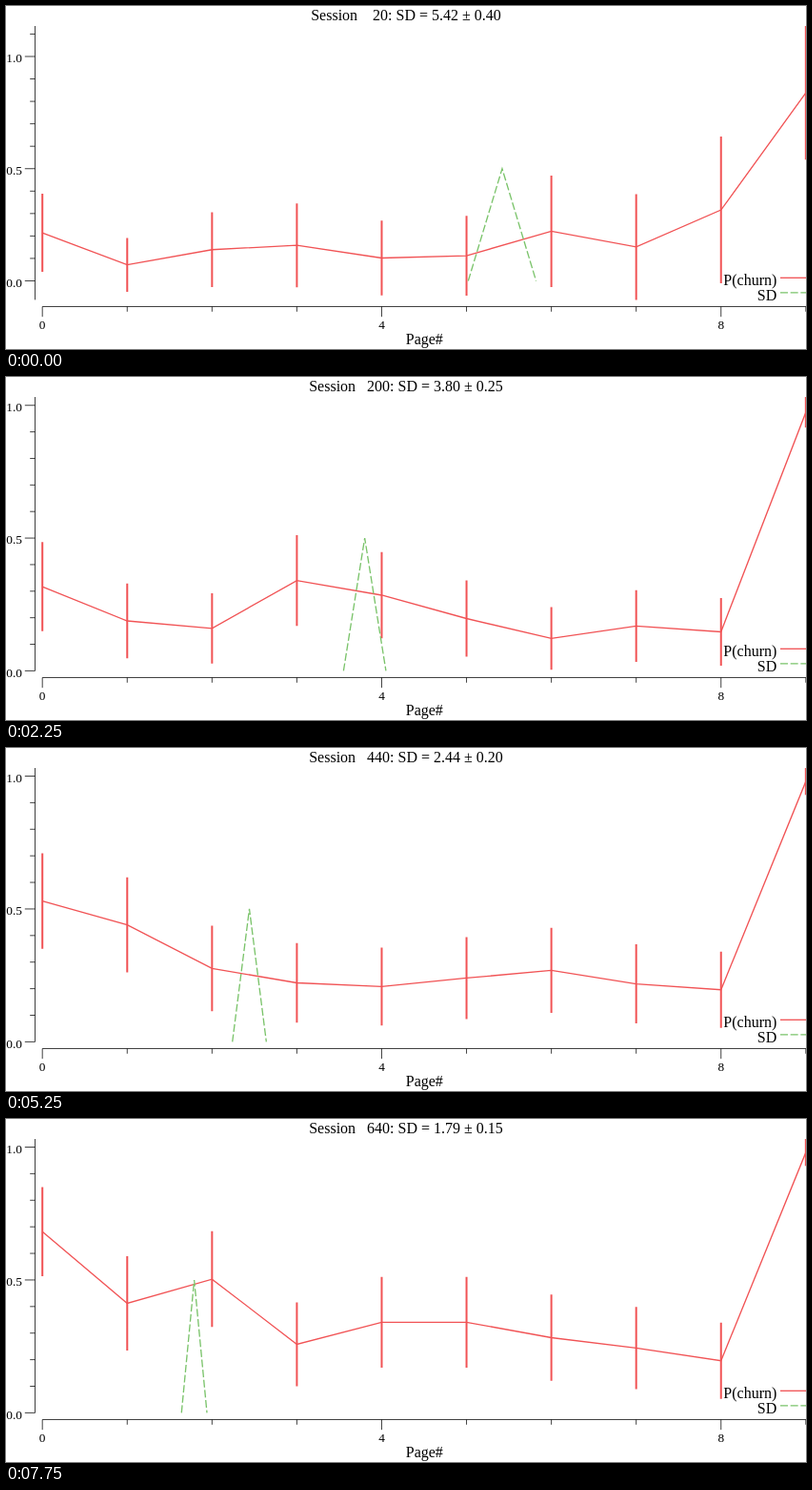
An HTML page for the animation above (8000 ms loop, 840x360 px).

```html
<!DOCTYPE html>
<html lang="en">
<head>
<meta charset="utf-8">
<title>Churn by page</title>
<style>
html, body { margin: 0; width: 100%; height: 100%; overflow: hidden; background: #fff; }
svg { display: block; width: 840px; height: 360px; }
text { font-family: "Liberation Serif", "Times New Roman", serif; font-size: 16px; white-space: pre; }
.small { font-size: 13.33px; }
.mid { text-anchor: middle; }
.end { text-anchor: end; }
path { fill: none; }
.axis { stroke: #000; stroke-width: .75; }
.churn { stroke: #f15355; stroke-width: 1.33; }
.bars { stroke: #f15355; stroke-width: 2; }
.depth { stroke: #7ac36a; stroke-width: 1.33; stroke-dasharray: 8 2.67; }
</style>
</head>
<body>
<svg viewBox="0 0 840 360">
  <path id="xAxis" class="axis"/>
  <path id="yAxis" class="axis"/>
  <g id="yLabels">
    <text class="small end" x="17">0.0</text>
    <text class="small end" x="17">0.5</text>
    <text class="small end" x="17">1.0</text>
  </g>
  <text class="small mid" x="38.2" y="339.3">0</text>
  <text class="small mid" x="394.5" y="339.3">4</text>
  <text class="small mid" x="750.8" y="339.3">8</text>
  <text class="mid" x="439.3" y="355">Page#</text>
  <path id="churn" class="churn"/>
  <path id="bars" class="bars"/>
  <path id="depth" class="depth"/>
  <text class="end" x="809.3" y="293">P(churn)</text>
  <text class="end" x="809.3" y="308.5">SD</text>
  <path class="churn" d="M813 285.3H840"/>
  <path class="depth" d="M813 300.8H840"/>
  <text id="title" class="mid" x="420" y="15.3"></text>
</svg>
<script>
const STEP = 250, STEPS = 32, TOP = 21, BOTTOM = 308.4;
const FULL = 7.7; // sample weight once a page has enough visits
const full = Array(10).fill(FULL);

// step, session depth, its error, churn probability per page, sample weight per page
const keys = [
  [0, 5.42, .40, [.214, .0714, .139, .1585, .102, .112, .221, .151, .316, .838],
    [5.55, 4.6, 4.31, 3.82, 3.29, 3.13, 2.79, 2.31, 2.02, 1.53]],
  [3, 5.00, .26, [.258, .1177, .15, .2035, .058, .0953, .131, .185, .226, .956],
    [...full.slice(3), 7.1, 5.9, 5]],
  [9, 3.80, .25, [.317, .188, .16, .34, .285, .197, .122, .169, .147, .974], full],
  [16, 3.00, .23, [.426, .306, .267, .306, .208, .203, .236, .196, .186, .98], full],
  [21, 2.44, .20, [.53, .44, .276, .222, .208, .24, .269, .218, .196, .98], full],
  [24, 2.13, .18, [.63, .371, .366, .194, .277, .273, .284, .244, .196, .98], full],
  [31, 1.79, .15, [.682, .412, .503, .258, .341, .341, .283, .244, .196, .98], full]
];

const $ = id => document.getElementById(id);
const setPath = (id, d) => $(id).setAttribute("d", d);
const mix = (a, b, u) => Array.isArray(a) ? a.map((v, i) => mix(v, b[i], u)) : a + (b - a) * u;
const px = page => 38.2 + 89.07 * page;
const labels = [...$("yLabels").children];

function stateAt(step) {
  let i = 0;
  while (i < keys.length - 2 && step >= keys[i + 1][0]) i++;
  const a = keys[i], b = keys[i + 1];
  return mix(a, b, (step - a[0]) / (b[0] - a[0]));
}

function drawXAxis() {
  let d = "M38.2 315.5H840";
  for (let i = 0; i < 10; i++) d += `M${px(i)} 315.5v${i % 4 ? 5.3 : 10.7}`;
  setPath("xAxis", d);
}

function draw(step) {
  const [, depth, err, mean, weight] = stateAt(step);
  const half = mean.map((m, i) => Math.sqrt(m * (1 - m) / weight[i]));
  const lo = Math.min(0, ...mean.map((m, i) => m - half[i]));
  const hi = Math.max(...mean.map((m, i) => m + half[i]));
  const py = v => BOTTOM - (v - lo) / (hi - lo) * (BOTTOM - TOP);

  let axis = `M30.5 ${TOP}V${BOTTOM}`;
  for (let k = Math.ceil(lo * 10); k <= hi * 10; k++)
    axis += `M30.5 ${py(k / 10)}h${k % 5 ? -5.3 : -10.7}`;
  setPath("yAxis", axis);
  labels.forEach((label, i) => label.setAttribute("y", py(i / 2) + 6.3));

  setPath("churn", "M" + mean.map((m, i) => `${px(i)} ${py(m)}`).join("L"));
  setPath("bars", mean.map((m, i) => `M${px(i)} ${py(m - half[i])}V${py(m + half[i])}`).join(""));
  setPath("depth", `M${px(depth - err)} ${py(0)}L${px(depth)} ${py(.5)}L${px(depth + err)} ${py(0)}`);

  const session = String(20 * (step + 1)).padStart(5);
  $("title").textContent = `Session ${session}: SD = ${depth.toFixed(2)} ± ${err.toFixed(2)}`;
}

let shown = -1;
function tick() {
  const step = Math.floor(performance.now() / STEP) % STEPS;
  if (step !== shown) draw(shown = step);
  requestAnimationFrame(tick);
}

drawXAxis();
tick();
</script>
</body>
</html>
```
